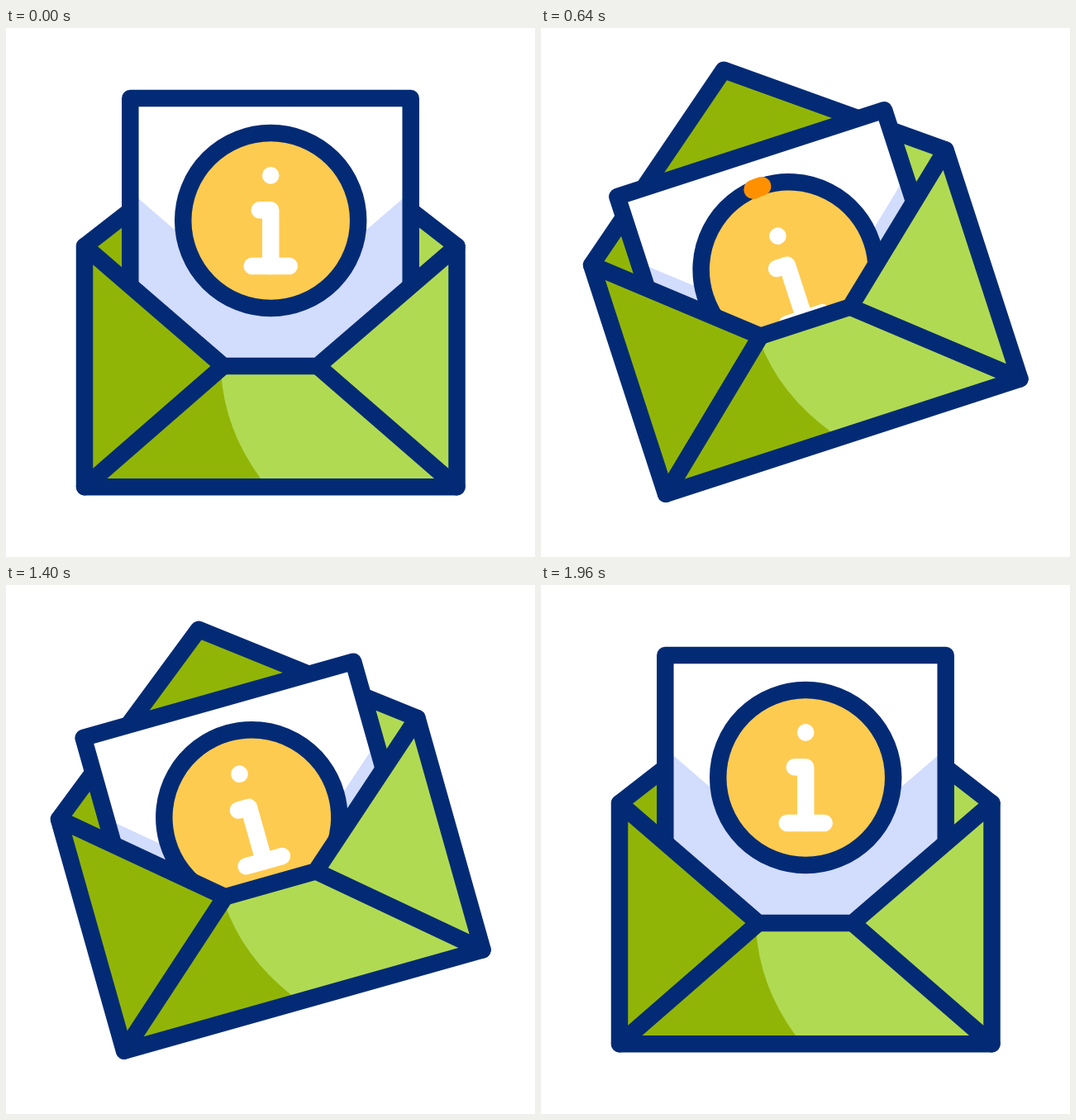
An HTML page with a canvas that plays this animation: 640 by 640 pixels, repeating every 2000 ms.

```html
<!DOCTYPE html>
<html lang="en">
<head>
<meta charset="utf-8">
<title>Information mail</title>
<style>
  html, body { margin: 0; width: 100%; height: 100%; overflow: hidden; background: #fff; }
  canvas { display: block; width: 100vw; height: 100vh; }
</style>
</head>
<body>
<canvas id="stage"></canvas>
<script>
const LOOP = 2000, STEP = 40, SIZE = 640, LINE = 20.5;
const NAVY = '#032b75', DARK = '#91b507', LIGHT = '#b1da53', PALE = '#d2dcfd',
      YELLOW = '#fdcb50', ORANGE = '#ff9100', WHITE = '#fff';

const canvas = document.getElementById('stage');
const ctx = canvas.getContext('2d');

const smooth = u => u * u * (3 - 2 * u);

// Time curve with flat ends and handles a, b; solved by bisection.
function bezier(a, b) {
  return u => {
    let lo = 0, hi = 1;
    for (let i = 0; i < 24; i++) {
      const s = (lo + hi) / 2, r = 1 - s;
      if (3 * s * r * r * a + 3 * s * s * r * b + s ** 3 < u) lo = s; else hi = s;
    }
    return smooth(lo);
  };
}
const settle = bezier(0.39, 0.48);

// Each key: [time, value, easing towards it]
const tracks = {
  angle:  [[120, 0], [560, 18], [1240, 18], [1960, 0, settle]],
  x:      [[120, 0], [350, 13.2], [560, 0]],
  y:      [[120, 0], [314, 31], [560, -54], [1240, -54], [1960, 0, settle]],
  flap:   [[120, 175], [400, 192], [600, 175]],
  paper:  [[120, 179], [400, 227.7], [600, 62.7], [720, 86.7], [1430, 86.7], [1960, 179]],
  shade:  [[120, 100], [400, 157], [600, 19], [1520, 19], [1960, 100]],
  stem:   [[120, 0], [400, -19], [600, 9.5], [720, 0]],
  dot:    [[120, 0], [400, -11], [600, 16], [720, 0]],
  head:   [[600, 0], [1130, 1]],
  tail:   [[880, 0], [1400, 1]]
};

function valueAt(keys, t) {
  if (t <= keys[0][0]) return keys[0][1];
  for (let i = 1; i < keys.length; i++) {
    const [t0, v0] = keys[i - 1], [t1, v1, ease = smooth] = keys[i];
    if (t < t1) return v0 + (v1 - v0) * ease((t - t0) / (t1 - t0));
  }
  return keys[keys.length - 1][1];
}

function trace(points, close) {
  ctx.beginPath();
  points.forEach(([x, y]) => ctx.lineTo(x, y));
  if (close) ctx.closePath();
}

function fill(color) {
  ctx.fillStyle = color;
  ctx.fill();
}

function stroke(color, width = LINE) {
  ctx.strokeStyle = color;
  ctx.lineWidth = width;
  ctx.stroke();
}

const TOP = 264;
const TL = [95, TOP], TR = [545.5, TOP], BL = [95, 555.3], BR = [545.5, 555.3];
const FL = [263, 409], FR = [377, 409];

function drawBack(p) {
  const tip = [320, TOP - p.flap];
  trace([TL, tip, TR, FR, FL], true);
  fill(DARK);
  ctx.save();
  ctx.clip();
  ctx.fillStyle = LIGHT;
  ctx.fillRect(470, 0, 170, SIZE);
  ctx.restore();
  trace([TL, tip, TR]);
  stroke(NAVY);
}

function drawPaper(p) {
  const top = TOP - p.paper;
  const sheet = [[150.3, 480], [150.3, top], [489.7, top], [489.7, 480]];
  ctx.save();
  // Keep the sheet inside the pocket.
  trace([[95, -400], TL, FL, FR, TR, [545.5, -400]], true);
  ctx.clip();
  trace(sheet, true);
  fill(WHITE);
  ctx.save();
  ctx.clip();
  const lift = -13.9 - p.shade;
  trace([[95, TOP + lift], [265, 410.7 + lift], [375, 410.7 + lift],
         [545.5, TOP + lift], [545.5, 600], [95, 600]], true);
  fill(PALE);
  ctx.restore();
  trace(sheet);
  stroke(NAVY);
  drawBadge(p, top + 148);
  ctx.restore();
}

function drawBadge(p, cy) {
  ctx.save();
  ctx.translate(320.2, cy);
  ctx.beginPath();
  ctx.arc(0, 0, 106, 0, Math.PI * 2);
  fill(YELLOW);
  stroke(NAVY);

  if (p.head > p.tail) {
    const at = k => -Math.PI / 2 - k * Math.PI * 2;
    ctx.beginPath();
    if (p.head - p.tail >= 1) ctx.arc(0, 0, 106, 0, Math.PI * 2);
    else ctx.arc(0, 0, 106, at(p.tail), at(p.head), true);
    stroke(ORANGE, 23);
  }

  ctx.beginPath();
  ctx.arc(0, p.dot - 54.6, 10.3, 0, Math.PI * 2);
  fill(WHITE);
  ctx.translate(0, p.stem);
  trace([[-13.5, -12.8], [0, -12.8], [0, 55]]);
  stroke(WHITE);
  trace([[-22.5, 55], [22.5, 55]]);
  stroke(WHITE);
  ctx.restore();
}

function drawFront() {
  const body = [TL, FL, FR, TR, BR, BL];
  trace(body, true);
  fill(LIGHT);
  ctx.beginPath();
  ctx.moveTo(...TL);
  ctx.lineTo(260, 406);
  ctx.lineTo(260, 415);
  ctx.quadraticCurveTo(264, 485, 308, 545);
  ctx.lineTo(308, 555);
  ctx.lineTo(...BL);
  ctx.closePath();
  fill(DARK);
  trace(body, true);
  stroke(NAVY);
  trace([BL, FL]);
  stroke(NAVY);
  trace([BR, FR]);
  stroke(NAVY);
}

function render(t) {
  const p = {};
  for (const name in tracks) p[name] = valueAt(tracks[name], t);

  const dpr = window.devicePixelRatio || 1;
  const w = Math.round(innerWidth * dpr), h = Math.round(innerHeight * dpr);
  if (canvas.width !== w || canvas.height !== h) {
    canvas.width = w;
    canvas.height = h;
  }
  ctx.setTransform(w / SIZE, 0, 0, h / SIZE, 0, 0);
  ctx.fillStyle = WHITE;
  ctx.fillRect(0, 0, SIZE, SIZE);
  ctx.lineCap = ctx.lineJoin = 'round';

  ctx.translate(320.2 + p.x, 409.6 + p.y);
  ctx.rotate(-p.angle * Math.PI / 180);
  ctx.translate(-320.2, -409.6);
  drawBack(p);
  drawPaper(p);
  drawFront();
}

const start = performance.now();
function tick() {
  const t = (performance.now() - start) % LOOP;
  render(Math.floor(t / STEP) * STEP);
  requestAnimationFrame(tick);
}
tick();
</script>
</body>
</html>
```
